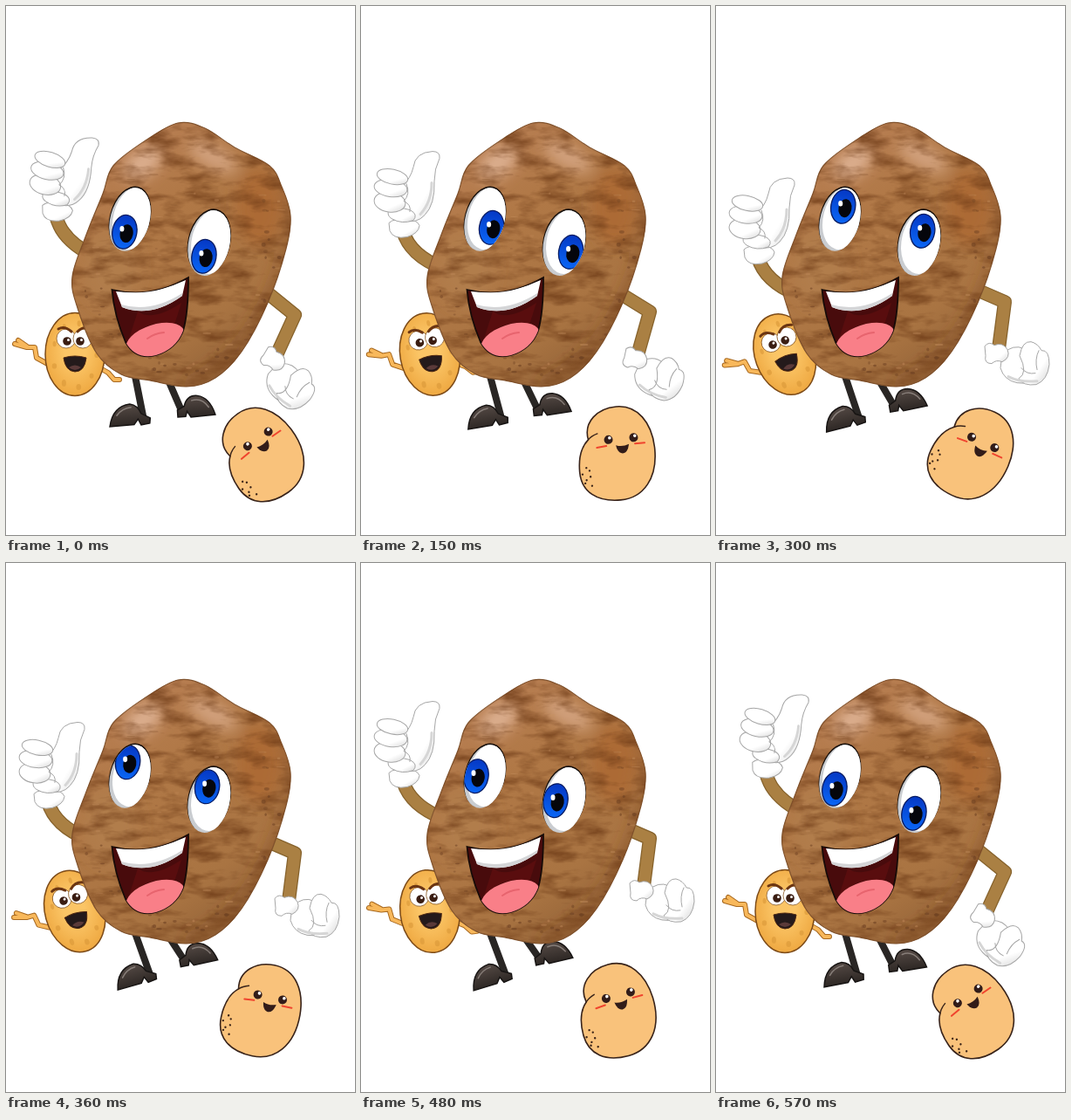
An HTML page for the animation above (0.6 s loop, 400 by 606 pixels).

```html
<!DOCTYPE html>
<html lang="en">
<head>
<meta charset="utf-8">
<title>Potato friends</title>
<style>
html, body { margin: 0; width: 100%; height: 100%; overflow: hidden; background: #fff; }
svg { display: block; width: 400px; height: 606px; }
.glove { fill: url(#glove); stroke: #a6a6a6; stroke-width: 1; }
.line { fill: none; stroke-linecap: round; stroke-linejoin: round; }
.fold { stroke: #a6a6a6; stroke-width: 1; }
.shade { stroke: #d6d6d6; stroke-width: 3; }
.sleeve { stroke: #86622c; stroke-width: 16; }
.sleeve + .sleeve { stroke: #aa8043; stroke-width: 13.5; }
.leg { stroke: #292624; stroke-width: 8; }
.shoe { fill: url(#shoe); stroke: #171413; stroke-width: 1.5; }
.shine { stroke: #877e79; stroke-width: 1.5; }
.limb { stroke: #a7681f; stroke-width: 6; }
.limb + .limb { stroke: #f8b85b; stroke-width: 4; }
.cheek { stroke: #f0442e; stroke-width: 2; }
</style>
</head>
<body>
<svg viewBox="0 0 400 606">
  <defs>
    <linearGradient id="skin" x1=".2" y1="0" x2=".75" y2="1">
      <stop offset="0" stop-color="#ba8056"/>
      <stop offset=".35" stop-color="#b07846"/>
      <stop offset=".75" stop-color="#a97442"/>
      <stop offset="1" stop-color="#8f5f35"/>
    </linearGradient>
    <linearGradient id="iris" x1="0" y1="0" x2="0" y2="1">
      <stop offset="0" stop-color="#0538c4"/>
      <stop offset="1" stop-color="#0a66f5"/>
    </linearGradient>
    <linearGradient id="glove" x1="0" y1="0" x2="1" y2="1">
      <stop offset=".65" stop-color="#fff"/>
      <stop offset="1" stop-color="#d2d2d2"/>
    </linearGradient>
    <linearGradient id="shoe" x1="0" y1="0" x2="0" y2="1">
      <stop offset="0" stop-color="#554a45"/>
      <stop offset="1" stop-color="#2d2724"/>
    </linearGradient>
    <radialGradient id="pale" cx=".5" cy=".45" r=".6">
      <stop offset=".3" stop-color="#fbc566"/>
      <stop offset="1" stop-color="#eda53d"/>
    </radialGradient>
    <filter id="soft" x="-50%" y="-50%" width="200%" height="200%"><feGaussianBlur stdDeviation="8"/></filter>
    <filter id="grain" x="0" y="0" width="100%" height="100%" color-interpolation-filters="sRGB">
      <feTurbulence type="fractalNoise" baseFrequency=".025 .07" numOctaves="4" seed="5"/>
      <feColorMatrix values="0 0 0 0 .42  0 0 0 0 .22  0 0 0 0 .08  1.8 0 0 0 -.75"/>
    </filter>
    <clipPath id="bodyClip"><path id="bodyCut"/></clipPath>
    <clipPath id="mouthClip"><use href="#mouth"/></clipPath>
  </defs>

  <!-- small potato on the left -->
  <g id="buddy">
    <path class="line limb" d="M46 409L35 403L33 391L24 391L10 387M24 390L14 383M108 415L117 420L124 428L130 428"/>
    <path class="line limb" d="M46 409L35 403L33 391L24 391L10 387M24 390L14 383M108 415L117 420L124 428L130 428"/>
    <ellipse cx="79" cy="399" rx="34" ry="47.500" fill="url(#pale)" stroke="#7c4a17" stroke-width="1.500"/>
    <g id="dimples" fill="#dc9a3a" opacity=".65"></g>
    <g fill="#fff" stroke="#8a5a25" stroke-width=".8">
      <circle cx="69" cy="381" r="11"/><circle cx="88" cy="381" r="11"/>
    </g>
    <g fill="#3a1d12"><circle cx="70" cy="384" r="4.800"/><circle cx="85" cy="384" r="4.800"/></g>
    <g fill="#fff"><circle cx="71.500" cy="382.500" r="1.500"/><circle cx="86.500" cy="382.500" r="1.500"/></g>
    <path class="line" d="M60 370Q67 366 75 373M82 373Q89 366 98 370" stroke="#6b3512" stroke-width="3"/>
    <path d="M66 403Q79 399 92 403Q90 419 79 419Q68 418 66 403Z" fill="#241a1b" stroke="#4a2512"/>
    <path d="M72 414Q79 409 86 414Q79 420 72 414Z" fill="#5b3a39"/>
  </g>

  <!-- legs -->
  <path id="legL" class="line leg"/>
  <path id="legR" class="line leg"/>
  <g id="shoeL">
    <path class="shoe" d="M0 0Q5 -23 25 -24Q34 -22 37 -12L47 -6L46 0L36 1L33 -6L28 0Z"/>
    <path class="line shine" d="M9 -12Q16 -20 26 -20"/>
  </g>
  <g id="shoeR">
    <path class="shoe" d="M0 0L0 -8L8 -12Q12 -25 24 -23Q38 -20 43 0L15 1L11 -6L9 0Z"/>
    <path class="line shine" d="M17 -18Q29 -21 36 -9"/>
  </g>

  <!-- raised arm -->
  <g id="armL">
    <path class="line sleeve" d="M48 250Q56 278 94 293"/>
    <path class="line sleeve" d="M48 250Q56 278 94 293"/>
    <path class="glove" d="M32 241Q38 235 51 238Q64 236 67 244Q66 253 53 257Q37 260 33 250Z"/>
    <path class="glove" d="M47 199Q57 190 60 177Q62 160 82 159Q91 159 90 167Q84 179 84 193Q85 220 73 232Q64 242 49 238L40 222Z"/>
    <path class="glove" d="M32 226Q43 222 56 226Q66 231 60 238Q47 243 35 236Q29 232 32 226Z"/>
    <ellipse class="glove" cx="33" cy="217" rx="18" ry="11.500" transform="rotate(8 33 217)"/>
    <ellipse class="glove" cx="34" cy="201" rx="19" ry="10" transform="rotate(8 34 201)"/>
    <ellipse class="glove" cx="36" cy="188" rx="18" ry="8.500" transform="rotate(12 36 188)"/>
    <path class="line fold" d="M52 196Q57 208 49 216Q58 220 56 228"/>
    <path class="line shade" d="M81 195Q81 217 68 231"/>
  </g>

  <!-- lowered arm -->
  <path id="armEdge" class="line sleeve"/>
  <path id="armFill" class="line sleeve"/>
  <g id="handR">
    <path class="glove" d="M7 2Q20 -10 32 -4L50 20Q43 39 24 35Q9 32 5 18Z"/>
    <path class="glove" d="M27 4Q30 -13 40 -12Q48 -10 52 -2Q61 -3 61 14Q59 32 46 37Q31 39 26 30Q37 24 27 4Z"/>
    <path class="line fold" d="M49 -2Q44 8 47 20M29 18Q35 26 45 24"/>
    <path class="line shade" d="M14 28Q28 35 47 33"/>
    <path class="glove" d="M-13 -7Q-8 -13 -2 -8Q8 -12 13 -3Q17 6 7 11Q0 8 -5 13Q-14 13 -12 4Z"/>
  </g>

  <!-- big potato -->
  <path id="body" fill="url(#skin)" stroke="#80532e" stroke-width="1.200"/>
  <g clip-path="url(#bodyClip)">
    <g filter="url(#soft)">
      <ellipse cx="157" cy="180" rx="26" ry="15" fill="#dbae8e" transform="rotate(-38 157 180)"/>
      <ellipse cx="237" cy="173" rx="31" ry="13" fill="#d2a17d" transform="rotate(28 237 173)"/>
      <ellipse cx="290" cy="230" rx="26" ry="45" fill="#ac6b36"/>
      <ellipse cx="120" cy="300" rx="32" ry="45" fill="#b17d4b"/>
      <path d="M322 200Q338 270 294 352Q262 412 208 436" fill="none" stroke="#7d4a22" stroke-width="10" opacity=".65"/>
    </g>
    <rect x="70" y="130" width="262" height="312" filter="url(#grain)"/>
    <g id="flecks"></g>
  </g>

  <g id="eyes"></g>

  <path id="mouth" d="M121.500 325Q166 336 209 311Q209 352 203 372Q195 393 172 400Q149 406 137 385Q124 355 121.500 325Z" fill="#480b0c" stroke="#160b08" stroke-width="1.800"/>
  <g clip-path="url(#mouthClip)">
    <path d="M151 350Q168 362 201 340L193 365Q165 357 141 381Z" fill="#650f10" opacity=".6"/>
    <ellipse cx="171" cy="383" rx="35" ry="18" fill="#f97f88" transform="rotate(-18 171 383)"/>
    <path class="line" d="M162 381Q170 375 181 374" stroke="#e7646e" stroke-width="2"/>
    <path d="M126 327Q168 332 206 314L202 332Q166 358 133 345Z" fill="#fff"/>
    <path d="M132 342Q166 352 202 329L202 332Q166 358 133 345Z" fill="#d4d5d7"/>
  </g>

  <!-- small potato on the right -->
  <g id="baby">
    <path d="M262 494C258 473 276 459 297 459C322 459 336 481 337 509C338 545 319 566 293 566C266 566 249 553 249 530C249 512 255 500 262 494Z" fill="#f9c27b" stroke="#38231a" stroke-width="1.600"/>
    <path class="line" d="M262 494Q266 490 273 488" stroke="#38231a" stroke-width="1.400"/>
    <g fill="#321c19"><circle cx="285" cy="496" r="5"/><circle cx="314" cy="496" r="5"/>
      <path d="M293 503Q300 506 308 503Q306 513 300 513Q294 512 293 503Z"/></g>
    <g fill="#fff"><circle cx="286.500" cy="494" r="1.800"/><circle cx="315.500" cy="494" r="1.800"/></g>
    <path class="line cheek" d="M271 504L282 503M315 503L326 503"/>
    <g id="dots" fill="#3d2518"></g>
  </g>
</svg>
<script>
const LOOP = 600, STEP = 30, SWING = 570;
const $ = id => document.getElementById(id);
const set = (id, name, value) => $(id).setAttribute(name, value);

function add(parent, tag, attrs) {
  const el = document.createElementNS("http://www.w3.org/2000/svg", tag);
  for (const k in attrs) el.setAttribute(k, attrs[k]);
  $(parent).append(el);
  return el;
}

// smooth closed curve through a few points
function blob(p) {
  const at = i => p[(i + p.length) % p.length];
  const handle = (i, sign) => at(i).map((v, k) => v + sign * (at(i + 1)[k] - at(i - 1)[k]) / 6);
  return "M" + p[0] + p.map((_, i) => `C${handle(i, 1)} ${handle(i + 1, -1)} ${at(i + 1)}`).join("") + "Z";
}

let seed = 11;
const rnd = () => (seed = seed * 16807 % 2147483647) / 2147483647;

const outline = blob([[197, 134], [228, 140], [262, 162], [302, 183], [316, 207], [326, 240], [321, 278],
  [300, 340], [270, 396], [240, 426], [207, 436], [165, 429], [132, 422], [104, 398], [82, 346],
  [76, 310], [92, 262], [111, 215], [123, 183], [160, 154]]);
set("body", "d", outline);
set("bodyCut", "d", outline);

for (let i = 0; i < 90; i++) {
  add("flecks", "ellipse", {
    cx: 80 + rnd() * 245, cy: 140 + rnd() * 292, rx: 1 + rnd() * 5, ry: .5 + rnd(),
    fill: rnd() < .5 ? "#87562f" : "#c79262", opacity: .15 + rnd() * .3
  });
}
// darker pits near the rim
for (let i = 0; i < 40; i++) {
  const a = -.6 + rnd() * 3.5, r = .8 + rnd() * .17;
  add("flecks", "ellipse", {
    cx: 199 + 118 * r * Math.cos(a), cy: 285 + 146 * r * Math.sin(a),
    rx: 1 + rnd() * 2.5, ry: .8 + rnd() * 1.6, fill: "#6d4022", opacity: .3 + rnd() * .35
  });
}
for (let i = 0; i < 9; i++) {
  const a = i * .7;
  add("dimples", "ellipse", { cx: 79 + 25 * Math.cos(a), cy: 400 + 37 * Math.sin(a), rx: 2 + rnd(), ry: 3 + rnd() });
}
for (let i = 0; i < 7; i++) {
  add("dots", "circle", { cx: 257 + 5 * Math.sin(i * 2.4), cy: 526 + i * 3.5, r: 1.2 });
}

function eye(id, cx, cy, rx, ry, tilt) {
  const turn = `rotate(${tilt} ${cx} ${cy})`;
  add("eyes", "g").innerHTML = `
    <clipPath id="${id}Clip"><ellipse cx="${cx}" cy="${cy}" rx="${rx}" ry="${ry}" transform="${turn}"/></clipPath>
    <ellipse cx="${cx - .3}" cy="${cy - 1.2}" rx="${rx + .7}" ry="${ry + .6}" transform="${turn}" fill="#17100c"/>
    <g clip-path="url(#${id}Clip)">
      <rect x="${cx - 40}" y="${cy - 50}" width="80" height="100" fill="#c9ccd0"/>
      <ellipse cx="${cx + 4}" cy="${cy - 3}" rx="${rx + 1}" ry="${ry}" transform="${turn}" fill="#fff"/>
      <g id="${id}">
        <ellipse rx="14" ry="19.500" fill="url(#iris)" stroke="#071b62" stroke-width="1.300" transform="rotate(10)"/>
        <ellipse cx="2.500" cy="1.500" rx="7.500" ry="10.500" fill="#05060c" transform="rotate(10)"/>
        <ellipse cx="-3" cy="-3.500" rx="2.500" ry="3.300" fill="#fff"/>
      </g>
    </g>`;
}
eye("ballL", 142, 244.5, 22.5, 37, 15);
eye("ballR", 232.8, 271.5, 23.5, 38, 13);

const place = (id, x, y, a = 0) => set(id, "transform", `translate(${x} ${y}) rotate(${a})`);

function leg(side, hip, heelX, x, y, tilt) {
  const a = tilt * Math.PI / 180;
  place("shoe" + side, x, y, tilt);
  set("leg" + side, "d", `M${hip}L${x + heelX * Math.cos(a)} ${y - 5 + heelX * Math.sin(a)}`);
}

function draw(t) {
  // even swing there and back, 0 to 1 to 0
  const sway = t < 300 ? t / 300 : Math.max(0, (SWING - t) / (SWING - 300));
  set("buddy", "transform", `rotate(${-20 * sway} 79 400)`);
  set("baby", "transform", `rotate(${-35 + 60 * sway} 294 513)`);

  const tip = Math.max(0, 1 - 3.3 * sway);
  set("armL", "transform", `translate(${12 * tip} ${-11 + 49 * sway ** 1.4}) rotate(${5 * tip} 50 215)`);

  // eyes roll round an ellipse
  const roll = 2 * Math.PI * (t / SWING - .1);
  const dx = 9.5 * Math.sin(roll), dy = 17 * Math.cos(roll);
  place("ballL", 141.5 + dx, 245 + dy);
  place("ballR", 232.5 + dx, 273 + dy);

  // the arm lifts faster and faster, then drops back
  const lift = t < 490 ? t / 490 : Math.max(0, (SWING - t) / 80);
  const open = Math.min(1, 1.7 * lift);
  const elbowY = 354 - 40 * lift ** 2;
  const wristX = 307 + 14 * open, wristY = 404 - 32 * lift ** 3;
  const arm = `M294 ${elbowY - 30 + 14 * open}L331 ${elbowY}L${wristX + 3} ${wristY - 4}`;
  set("armEdge", "d", arm);
  set("armFill", "d", arm);
  place("handR", wristX, wristY, 36 * (1 - open));

  const step = t < 430 ? t / 430 : Math.cos((t - 430) / 200 * Math.PI / 2);
  leg("L", "148 424", 39, 119 + 11 * step, 482 + 8.5 * step, -5 - 13 * step);
  leg("R", "184 424", 5, 197 + 4 * step, 471 - 12 * step ** 2, -4 - 8 * step);
}

const start = performance.now();
function tick() {
  const t = (performance.now() - start) % LOOP;
  draw(Math.floor(t / STEP) * STEP);
  requestAnimationFrame(tick);
}
tick();
</script>
</body>
</html>
```
